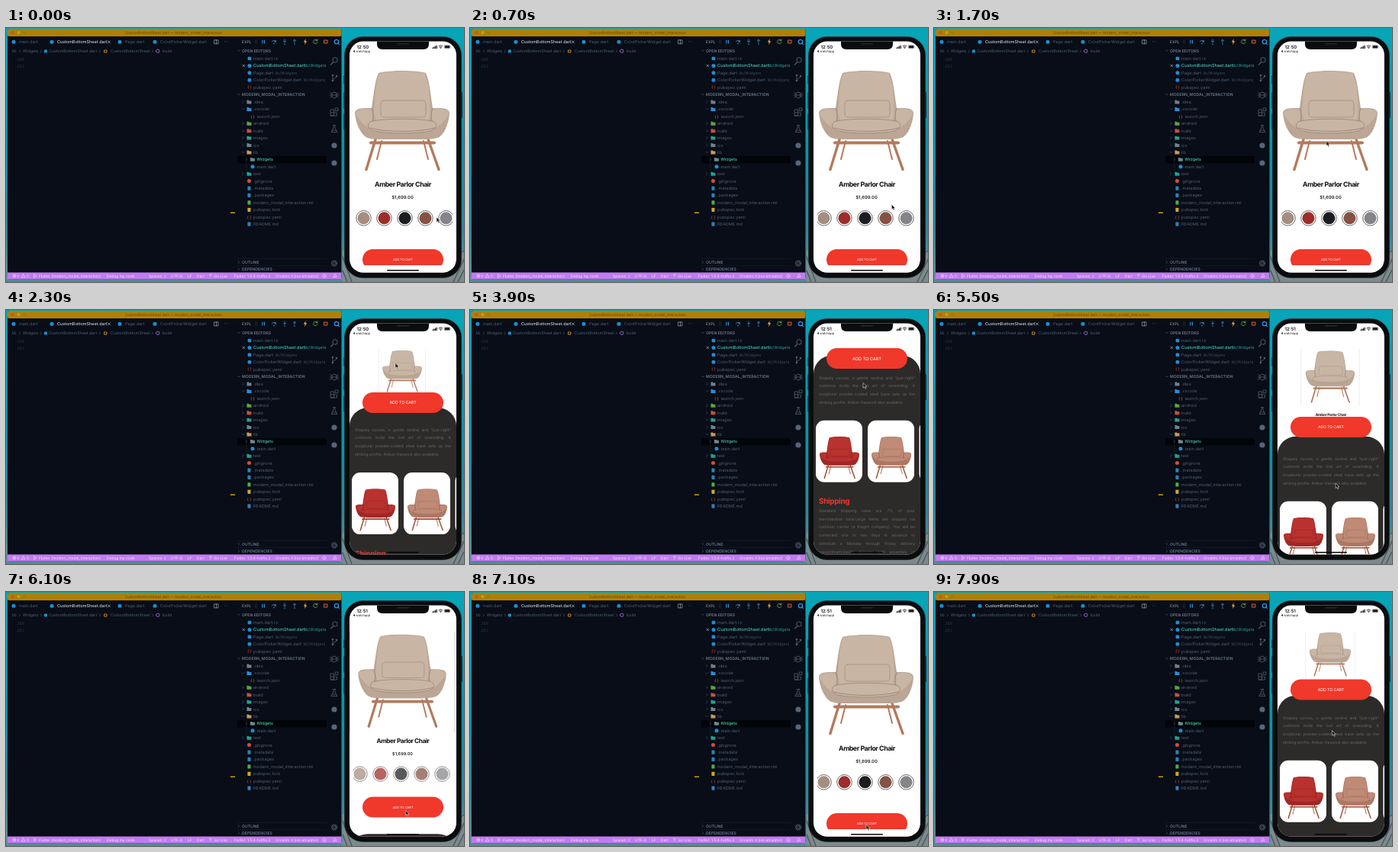
An HTML page for the animation above (8000 ms loop, 600 px wide and 333 px high).

```html
<!DOCTYPE html>
<html lang="en">
<head>
<meta charset="utf-8">
<title>Modal interaction</title>
<style>
html, body { margin: 0; width: 100%; height: 100%; overflow: hidden; background: #079fb2; }
svg { display: block; width: 600px; height: 333px; }
text, .copy { font-family: Inter, "Open Sans", sans-serif; text-rendering: geometricPrecision; }
.mono { font-family: "Noto Sans Mono", monospace; }
.copy div { height: 10.75px; line-height: 10.75px; font-size: 5.1px; color: #696866; white-space: nowrap; text-align-last: justify; }
.copy div.end { text-align-last: left; }
.beige { --light: #c9b5a4; --mid: #bba695; --dark: #9b8575; --leg: #b27a5d; }
.red { --light: #b8322f; --mid: #a32726; --dark: #761b1b; --leg: #9c432e; }
.tan { --light: #bf8a76; --mid: #ae7864; --dark: #8b5a49; --leg: #a04b33; }
</style>
</head>
<body>
<svg viewBox="0 0 600 333" xmlns="http://www.w3.org/2000/svg">
  <defs>
    <linearGradient id="wall" x2="0" y2="1">
      <stop offset="0" stop-color="#08a5b8"/><stop offset=".5" stop-color="#0794a8"/><stop offset=".8" stop-color="#2f8797"/><stop offset="1" stop-color="#6d8f98"/>
    </linearGradient>
    <clipPath id="screen"><rect x="450" y="17.5" width="140" height="303" rx="18"/></clipPath>
    <clipPath id="row"><rect x="455" y="236" width="130" height="28"/></clipPath>
    <g id="chair" stroke-linecap="round">
      <g fill="none" stroke="var(--leg)">
        <path d="M-27 26L-33 50M28 26L34 50" stroke-width="2"/>
        <path d="M-41 28.5H42" stroke-width="4"/>
        <path d="M-35 24L-47 63.5M34 24L48 63.5" stroke-width="3.4"/>
      </g>
      <path fill="var(--mid)" d="M-31-63C-18-67 18-67 31-63C36-52 37-36 40-17C50-17 62-18 62-10C61 2 57 13 51 19C46 24 35 24 20 24H-22C-36 24-45 24-50 19C-57 12-61 0-62-10C-62-18-50-17-40-17C-37-36-36-52-31-63Z"/>
      <path fill="var(--light)" d="M-30-62C-18-66 18-66 30-62C35-50 36-34 37-10L34 4H-34L-37-10C-36-34-35-50-30-62Z"/>
      <path fill="var(--light)" d="M-61-10C-61-16-46-17-40-15C-37-6-38 2-44 9C-52 4-58-3-61-10ZM61-10C61-16 46-17 40-15C37-6 38 2 44 9C52 4 58-3 61-10Z"/>
      <path fill="none" stroke="var(--dark)" stroke-width="1" d="M-40-16C-36-8-38 2-44 9M40-16C36-8 38 2 44 9"/>
      <rect x="-28" y="-27" width="59" height="22" rx="4" fill="var(--light)" stroke="var(--dark)" stroke-width=".6"/>
      <path fill="var(--light)" stroke="var(--dark)" stroke-width=".8" d="M-42 1C-28-4 28-4 42 1C47 5 44 11 37 13C20 17-20 17-37 13C-45 11-47 5-42 1Z"/>
      <path fill="none" stroke="var(--dark)" stroke-width=".9" d="M-43 9C-20 15 20 15 43 9"/>
    </g>
  </defs>
  <g id="desktop"></g>
  <g id="editor"></g>
  <g id="phone"></g>
  <g clip-path="url(#screen)">
    <rect x="450" y="17" width="140" height="304" fill="#fff"/>
    <g id="hero" class="beige">
      <path d="M-73.5-70V72M73.5-70V72" stroke="#e4e4e4" stroke-width="1.4"/>
      <use href="#chair"/>
    </g>
    <g id="title"></g>
    <g id="price"></g>
    <g id="colors"><g clip-path="url(#row)"><g id="swatches"></g></g></g>
    <g id="sheet"></g>
    <g id="button">
      <rect x="467" y="-13.5" width="106" height="27" rx="13.5" fill="#f0382b"/>
      <g id="label"></g>
    </g>
    <rect id="safe" x="450" y="311" width="140" height="10" fill="#fff"/>
    <g id="status"></g>
  </g>
  <path id="cursor" d="M0 0V6.6L1.6 5.2L2.7 7.7L3.9 7.2L2.8 4.8H4.8Z" fill="#111" stroke="#fff" stroke-width=".5"/>
</svg>
<script>
const $ = id => document.getElementById(id);
const put = (id, parts) => { $(id).innerHTML = parts.join(''); };
const text = (x, y, s, size, fill, extra = '') =>
  `<text x="${x}" y="${y + size * .36}" font-size="${size}" fill="${fill}" ${extra}>${s}</text>`;
const rect = (x, y, w, h, fill, rx = 0, extra = '') =>
  `<rect x="${x}" y="${y}" width="${w}" height="${h}" fill="${fill}" rx="${rx}" ${extra}/>`;
const dot = (x, y, r, fill, extra = '') => `<circle cx="${x}" cy="${y}" r="${r}" fill="${fill}" ${extra}/>`;
const line = (d, color, w = .8) =>
  `<path d="${d}" fill="none" stroke="${color}" stroke-width="${w}" stroke-linecap="round" stroke-linejoin="round"/>`;
const chevron = (x, y, open, color) =>
  line(open ? `M${x - 1.5} ${y - .8}l1.5 1.6l1.5-1.6` : `M${x - .8} ${y - 1.5}l1.6 1.5l-1.6 1.5`, color, .6);
const folder = (x, y, color) => `<path d="M${x - 3} ${y - 2.4}h2.4l.8 .9h2.8v4h-6z" fill="${color}"/>`;
const middle = 'text-anchor="middle"';

const blue = '#1b8fd6', dim = '#4f5e72', faint = '#3b485a', cyan = '#50e6d3', orange = '#e0653a';

put('desktop', [
  rect(0, 0, 600, 333, 'url(#wall)'),
  rect(0, 329.5, 441, 4, '#4f8d98'),
  rect(441, 292, 159, 41, '#7c8a8d'),
  line('M441 300l12 33M586 333l14-30M441 318l6 15M592 333l8-16M594 296l6-4', '#4e5b60', 1.5),
]);

function editor() {
  const out = [
    rect(2, 1, 437.5, 328.5, '#080d17', 2),
    rect(2, 1, 437.5, 10, '#b17f05', 2),
    dot(9, 6, 2, '#c4552c'), dot(16.5, 6, 2, '#d39a10'), dot(24, 6, 2, '#6f8f1c'),
    text(219, 6, 'CustomBottomSheet.dart — modern_modal_interaction', 4.9, '#614600', middle),
  ];

  // Tabs and breadcrumbs
  [[10, 'main.dart'], [60, 'CustomBottomSheet.dart'], [149, 'Page.dart'], [195, 'ColorPickerWidget.dart']]
    .forEach(([x, s], i) => out.push(dot(x, 18.3, 2.5, blue), text(x + 7, 18.3, s, 5.5, i == 1 ? '#e6edf0' : dim)));
  out.push(
    line('M133.5 16.8l3 3m0-3l-3 3', '#c5d0d5', .7),
    line('M273 15.8h5v5h-5zM275.5 15.8v5', '#9aa7ae', .7),
    text(286, 17.6, '···', 6, '#9aa7ae'),
  );
  [[8, 'lib'], [22, 'Widgets'], [56, 'CustomBottomSheet.dart'], [137, 'CustomBottomSheet'], [205, 'build']]
    .forEach(([x, s]) => out.push(text(x, 30.4, s, 5.3, dim)));
  [18, 46, 123, 192].forEach(x => out.push(chevron(x, 30.4, false, dim)));
  out.push(dot(52, 30.4, 2.2, blue), line('M129 29h3v3h-3z', '#d99033', .9), line('M197 29l2-1l2 1v2.5l-2 1l-2-1z', '#a06bd0', .9));
  ['280', '281'].forEach((s, i) => out.push(text(14, 41 + i * 9.5, s, 5.4, '#2a3542', 'class="mono"')));
  out.push(rect(294, 241.5, 6, 1.5, '#c9a211'));

  // Debug toolbar
  out.push(text(309, 18, 'EXPL', 5, '#9aa7ae'));
  for (let i = 0; i < 6; i++) out.push(dot(326.5 + i % 2 * 1.8, 16 + (i >> 1) * 2, .5, faint));
  out.push(
    line('M336 16v4M338.5 16v4', '#3c9be8', 1.1),
    line('M348.5 18a2.7 2.7 0 0 1 5 0M353.5 16v2h-2', '#3c9be8'), dot(351, 20.5, .8, '#3c9be8'),
    line('M365 15v3.6M363.4 17.2l1.6 1.6l1.6-1.6', '#3c9be8'), dot(365, 21, .8, '#3c9be8'),
    line('M378 19V15.3M376.4 16.8l1.6-1.6l1.6 1.6', '#3c9be8'), dot(378, 21, .8, '#3c9be8'),
    '<path d="M392.8 14l-3 4.5h2l-.7 3.5l3.2-4.7h-2z" fill="#f4a72a"/>',
    line('M407.5 16.2a2.7 2.7 0 1 0 .5 2.4M408 14.8v1.8h-1.9', '#77c159'),
    line('M417 16h4v4h-4z', '#e2632e', 1),
    line('M435 20l1.6 1.8', '#3c9be8', 1), dot(433, 18, 2.7, 'none', 'stroke="#2a94e8" stroke-width="1.3"'),
  );

  // Open files
  const header = (y, s, open) => out.push(chevron(305, y, open, dim), text(309, y, s, 5.2, '#6b7a8c', 'font-weight="600"'));
  header(29.8, 'OPEN EDITORS', true);
  [['main.dart', 'lib', 351], ['CustomBottomSheet.dart', 'lib/Widgets', 390.5], ['Page.dart', 'lib/Widgets', 352.5],
    ['ColorPickerWidget.dart', 'lib/Widgets', 389.5], ['pubspec.yaml']]
    .forEach(([s, path, x], i) => {
      const y = 40 + i * 9.4, on = i == 1;
      out.push(i == 4 ? text(319, y, '{ }', 5, orange, middle) : dot(319, y, 2.5, blue), text(324, y, s, 5.7, on ? cyan : dim));
      if (path) out.push(text(x, y, path, 5.4, on ? '#2fa094' : faint));
    });
  out.push(line('M310 48l2.8 2.8m0-2.8l-2.8 2.8', '#b9c5cb', .7));

  // Project tree: name, kind, icon colour, indent
  header(87.2, 'MODERN_MODAL_INTERACTION', true);
  out.push(rect(303, 168, 117, 9.4, '#010409'));
  [['.idea', 'd', '#71818b'], ['.vscode', 'o', '#2a8fd0'], ['launch.json', '{ }', '#d8933c', 4.5], ['android', 'd', '#5aa449'],
    ['build', 'd', '#c94f46'], ['images', 'd', '#2f9f91'], ['ios', 'd', '#71818b'], ['lib', 'o', '#d29a4a'],
    ['Widgets', 'd', '#6d8790', 4.5], ['main.dart', '', blue, 4.5], ['test', 'd', '#20a28d'], ['.gitignore', '', '#dc4b32'],
    ['.metadata', 'f', '#2b82b8'], ['.packages', 'f', '#2b82b8'], ['modern_modal_interaction.iml', 'f', '#4fae45'],
    ['pubspec.lock', 'f', '#d2a72f'], ['pubspec.yaml', '{ }', orange], ['README.md', 'f', '#2c83bd']]
    .forEach(([s, kind, color, dx = 0], i) => {
      const y = 97 + i * 9.42, x = 318.5 + dx;
      if (kind == 'd' || kind == 'o') out.push(chevron(x - 8, y, kind == 'o', dim), folder(x, y, color));
      else if (kind == 'f') out.push(rect(x - 2, y - 2.6, 4, 5.2, color, .6));
      else out.push(kind ? text(x, y, kind, 5, color, middle) : dot(x, y, 2.5, color));
      out.push(text(324 + dx, y, s, 5.55, s == 'Widgets' ? cyan : dim));
    });
  out.push(line('M315 168v18.5', '#24313a', .5), line('M303 302.5h117M303 311.5h117', '#18222b', .5));
  header(307, 'OUTLINE', false);
  header(316, 'DEPENDENCIES', false);

  // Activity bar
  out.push(
    line('M428.5 45L425.5 48', dim, 1.1), dot(431, 42, 3.2, 'none', `stroke="${dim}"`),
    line('M428 63v5M433 64c0 3-5 1-5 4', dim),
    dot(428, 62, 1.3, dim), dot(433, 63, 1.3, dim), dot(428, 69, 1.3, dim),
    line('M427 87a3 3 0 0 1 6 0v2a3 3 0 0 1-6 0zM424.5 85l2.5 1.5M435.5 85l-2.5 1.5M424.5 91l2.5-1.5M435.5 91l-2.5-1.5M424 88h12', dim),
    line('M425.5 107h4v8h-4zM425.5 111h8v4h-8M431.5 105h3.6v3.6h-3.6z', dim),
    line('M428.5 127.5h3M429 128v3l-3 5.5h8l-3-5.5v-3M427.5 134h5', dim),
    dot(430, 154, 3.6, '#56657a'), dot(430, 177, 3.6, '#56657a'),
    dot(430, 308.5, 3.4, 'none', `stroke="${dim}" stroke-width="1.5" stroke-dasharray="1.6 .8"`), dot(430, 308.5, 1.8, 'none', `stroke="${dim}"`),
  );

  // Status bar
  const pale = '#f3e6ff';
  out.push(rect(2, 320.5, 437.5, 9, '#c17af0'),
    dot(11, 325, 2, 'none', `stroke="${pale}" stroke-width=".6"`), line('M10.2 324.2l1.6 1.6m0-1.6l-1.6 1.6', pale, .5),
    line('M20.5 326.8h4.4l-2.2-4z', pale, .6), line('M37 323l3 2l-3 2z', pale, .6),
    line('M268 327v-3M266.3 323.6a2.5 2.5 0 0 1 3.4 0', pale, .6),
    dot(417, 325, 2.2, 'none', `stroke="${pale}" stroke-width=".6"`), line('M416 325.6q1 1 2 0', pale, .5),
    line('M429 326.5h4l-.7-1v-1.2a1.3 1.3 0 0 0-2.6 0v1.2z', pale, .6));
  [[14.5, '0'], [27, '0'], [43, 'Flutter (modern_modal_interaction)'], [132, 'Debug my code'], [187, 'Spaces: 2'],
    [216, 'UTF-8'], [238, 'LF'], [250, 'Dart'], [272.5, 'Go Live'], [298.5, 'Flutter: 1.5.4-hotfix.2'], [353, 'Orvanto 4 (ios emulator)']]
    .forEach(([x, s]) => out.push(text(x, 325, s, 4.9, pale)));
  return out;
}
put('editor', editor());

put('phone', [
  rect(442.3, 62, 3, 12, '#123a49', 1), rect(442.3, 84, 3, 22, '#123a49', 1), rect(442.3, 112, 3, 22, '#123a49', 1),
  rect(594.5, 84, 3.5, 34, '#123a49', 1),
  rect(443.5, 11.5, 153, 316, '#0b0c0e', 24, 'stroke="#22292e" stroke-width=".6"'),
]);
put('title', [text(0, 0, 'Amber Parlor Chair', 8.8, '#111', `${middle} font-weight="700" letter-spacing="-.45"`)]);
put('price', [text(0, 0, '$1,699.00', 5.9, '#222', `${middle} font-weight="600"`)]);
put('label', [text(0, 0, 'ADD TO CART', 4, '#fff', `${middle} letter-spacing="-.1"`)]);
put('swatches', ['#a58d7f', '#9d2d2a', '#1c1d20', '#855243', '#858589'].map((c, i) =>
  dot(463.5 + i * 27, 249.3, 9.8, '#fff', 'stroke="#444" stroke-width=".8"') + dot(463.5 + i * 27, 249.3, 8, c)));

const copy = (y, lines, last) => `<foreignObject x="457" y="${y}" width="126" height="90"><div class="copy">` +
  lines.map((s, i) => `<div class="${last && i == lines.length - 1 ? 'end' : ''}">${s}</div>`).join('') + '</div></foreignObject>';
const card = (x, kind) => rect(x, 85, 61, 81, '#fff', 11) +
  `<use href="#chair" class="${kind}" transform="translate(${x + 31} 134) scale(.42)"/>`;
put('sheet', [
  rect(450, 0, 140, 400, '#2c2b29', 24),
  copy(24.6, ['Shapely curves, a gentle recline and “just-right”', 'cushions invite the lost art of unwinding. A',
    'sculptural powder-coated steel base sets up the', 'striking profile. Amber Hassock also available.'], true),
  card(453, 'red'), card(521, 'tan'), card(588.5, 'beige'),
  text(457, 191, 'Shipping', 10, '#e5392d', 'font-weight="700" letter-spacing="-.4"'),
  copy(198.8, ['Standard Shipping rates are 7% of your', 'merchandise total.Large items are shipped via',
    'common carrier (a freight company). You will be', 'contacted one to two days in advance to',
    'schedule a Monday through Friday delivery', 'appointment.Inside delivery with assembly or']),
]);
put('status', [
  '<path d="M484 16h72q-2 0-2 3v2q0 7-7 7h-54q-7 0-7-7v-2q0-3-2-3z" fill="#0b0c0e"/>',
  rect(512, 20, 16, 1.4, '#25272b', .7),
  '<g id="clock"></g>',
  '<path d="M457 29.1v3l-2.3-1.5z" fill="#222"/>', text(458.3, 30.5, 'watchapp', 4.1, '#222'),
  ...[0, 1, 2, 3].map(i => rect(558.5 + i * 1.7, 25.5 - i * .9, 1.2, 1.6 + i * .9, '#111')),
  line('M567 23.8q2.4-2 4.8 0M568.2 25.3q1.2-1 2.4 0', '#111', .9), dot(569.4, 26.5, .6, '#111'),
  rect(574, 22.5, 8, 4.4, 'none', 1.3, 'stroke="#555" stroke-width=".5"'), rect(574.7, 23.2, 6.6, 3, '#111', .8),
  rect(499, 316.9, 42, 1.7, '#050505', .85),
]);

// Each track lists [time, values...]; values run straight between entries.
const REST = 303.5;
const buttonTrack = [[0, REST], [1700, REST], [2300, 121.5], [2800, 63.5], [4600, 63.5], [5500, 153.5], [6200, REST], [7200, REST], [7900, 128], [8000, 108]];
const cursorTrack = [[0, 564, 248], [500, 560, 248], [1700, 514, 148], [2300, 510, 69.5], [2800, 510, 50], [3900, 515, 95.5],
  [4600, 516, 140], [5500, 526, 227], [6200, 523, 296], [7100, 519, 305], [7900, 521.5, 181.5], [8000, 521.5, 167]];
const swatchTrack = [[0, 5], [500, 0], [8000, 0]];

function at(track, t) {
  const i = Math.max(1, track.findIndex(k => k[0] > t));
  const a = track[i - 1], b = track[i], f = (t - a[0]) / (b[0] - a[0]);
  return a.slice(1).map((v, n) => v + (b[n + 1] - v) * f);
}
const place = (id, x, y, s = 1) => $(id).setAttribute('transform', `translate(${x} ${y}) scale(${s})`);

let clock = '';
function draw(t) {
  const [y] = at(buttonTrack, t), lift = REST - y;
  place('button', 0, y);
  place('label', 520, 0, 1 + lift * .0019);
  place('sheet', 0, y + 39 - lift * .178);
  place('hero', 519, 122 - lift * .228, 1 - lift * .0032);
  place('title', 520, 205 - lift * .453, 1 - lift * .003);
  place('price', 519.5, 222 - lift * .48, 1 - lift * .003);
  place('colors', 0, -lift * .5);
  $('colors').setAttribute('opacity', Math.max(0, 1 - lift / 80));
  place('swatches', at(swatchTrack, t)[0], 0);
  $('safe').setAttribute('visibility', lift < 3 ? 'visible' : 'hidden');
  place('cursor', ...at(cursorTrack, t));
  const now = t < 3000 ? '12:50' : '12:51';
  if (now != clock) put('clock', [text(459.5, 24.4, clock = now, 6, '#111', 'font-weight="600"')]);
}

function tick() {
  draw(Math.floor(performance.now() % 8000 / 100) * 100);
  requestAnimationFrame(tick);
}
tick();
</script>
</body>
</html>
```
